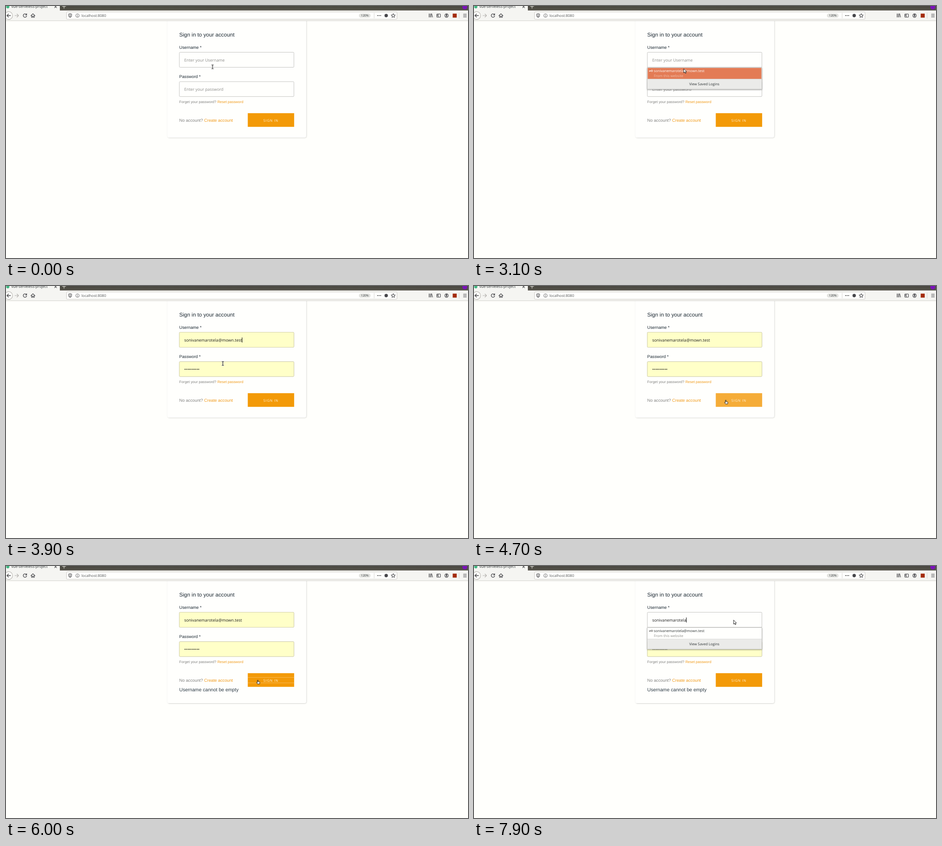
Write an HTML page that moves like this. It is 1012 px wide and 553 px high and loops after 8000 ms.

```html
<!DOCTYPE html>
<html lang="en">
<head>
<meta charset="utf-8">
<title>Sign in</title>
<style>
html, body { margin: 0; width: 100%; height: 100%; overflow: hidden; background: #fffffc; }
svg { display: block; }
text { font-family: "Liberation Sans", Arial, sans-serif; text-rendering: geometricPrecision; white-space: pre; }
.ui, .field { font-family: "Open Sans", "Noto Sans", sans-serif; }
.ui { font-size: 7.8px; fill: #2e3436; }
.field { font-size: 8.9px; fill: #1c1c1c; }
.hint { fill: #8b8b89; }
.label { font-size: 9.27px; fill: #1b2832; }
.small { font-size: 7.95px; }
.note { fill: #828280; }
.link { fill: #f09a1a; }
.box { fill: #fffffd; stroke: #c4c4c2; }
.auto { fill: #ffffc8; stroke: #d3d0ac; }
.icon { fill: none; stroke: #46464a; stroke-width: 1.1; stroke-linejoin: round; stroke-linecap: round; }

/* Every track shares one 8 s clock; 1.25% is 100 ms. */
.a { animation: 8s step-end infinite; }
.popup { animation-name: popup; }
.row { animation-name: row; }
.empty { animation-name: empty; }
.filled { animation-name: filled; }
.domain { animation-name: domain; }
.caret { animation-name: caret; }
.sel { animation-name: sel; }
.btn { animation-name: btn; }
.ring { animation-name: ring; }
.msg { animation-name: msg; }
.card { animation-name: card; }
.cursor { animation-name: move; }
.ibeam { animation-name: ibeam; }
.arrow { animation-name: arrow; }
.hand { animation-name: hand; }

@keyframes popup {
  0%, 45% { visibility: hidden; }
  15%, 98.75%, 100% { visibility: visible; }
}
@keyframes row {
  0%, 45%, 100% { --row: #fffffd; --name: #2e3436; --sub: #8f8f8d; --key: #555; }
  38.75% { --row: #e37b55; --name: #fff; --sub: #f0bfa9; --key: #fff; }
}
@keyframes empty {
  0% { visibility: visible; }
  46.25%, 100% { visibility: hidden; }
}
@keyframes filled {
  0% { visibility: hidden; }
  46.25%, 100% { visibility: visible; }
}
@keyframes domain {
  0%, 98.75%, 100% { visibility: hidden; }
  46.25% { visibility: visible; }
}
@keyframes caret {
  0%, 32.5%, 58.75% { visibility: hidden; transform: none; }
  13.75%, 43.75% { visibility: visible; transform: none; }
  46.25% { visibility: visible; transform: translateX(126px); }
  98.75%, 100% { visibility: visible; transform: translateX(74px); }
}
@keyframes sel {
  0%, 98.75%, 100% { width: 0; }
  88.75% { width: 23px; }
  90% { width: 52px; }
}
@keyframes btn {
  0%, 63.75%, 75%, 100% { fill: #f39a08; }
  52.5%, 66.25% { fill: #f5ac38; }
}
@keyframes ring {
  0%, 88.75%, 100% { visibility: hidden; }
  63.75% { visibility: visible; }
}
@keyframes msg {
  0% { visibility: hidden; }
  66.25%, 100% { visibility: visible; }
}
@keyframes card {
  0% { height: 268px; }
  66.25%, 100% { height: 280.5px; }
}
@keyframes move {
  0% { transform: translate(452.4px, 133.5px); }
  1.25% { transform: translate(459px, 134px); }
  8.75% { transform: translate(460px, 131px); }
  10% { transform: translate(460px, 126px); }
  11.25% { transform: translate(459px, 123px); }
  15% { transform: translate(457.5px, 120.5px); }
  38.75% { transform: translate(459px, 137px); }
  40% { transform: translate(461.2px, 149.8px); }
  48.75% { transform: translate(475px, 170px); }
  50% { transform: translate(507px, 204px); }
  51.25% { transform: translate(545px, 226px); }
  52.5% { transform: translate(586px, 240px); }
  55% { transform: translate(542px, 253px); }
  56.25% { transform: translate(551.4px, 249.8px); }
  76.25% { transform: translate(537px, 238px); }
  77.5% { transform: translate(505px, 206px); }
  78.75% { transform: translate(478px, 176px); }
  80% { transform: translate(461px, 135px); }
  81.25% { transform: translate(468px, 115.5px); }
  85% { transform: translate(470px, 118px); }
  86.25% { transform: translate(466.8px, 119px); }
  88.75% { transform: translate(490px, 119px); }
  90% { transform: translate(540px, 119px); }
  91.25% { transform: translate(569px, 119.8px); }
  93.75% { transform: translate(569.4px, 119px); }
  98.75%, 100% { transform: translate(568.2px, 118px); }
}
@keyframes ibeam {
  0%, 8.75%, 48.75%, 78.75% { visibility: visible; }
  1.25%, 15%, 50%, 98.75%, 100% { visibility: hidden; }
}
@keyframes arrow {
  0%, 8.75%, 48.75%, 52.5%, 78.75% { visibility: hidden; }
  1.25%, 15%, 50%, 77.5%, 98.75%, 100% { visibility: visible; }
}
@keyframes hand {
  0%, 77.5%, 100% { visibility: hidden; }
  52.5% { visibility: visible; }
}
</style>
</head>
<body>
<svg width="1012" height="553" viewBox="0 0 1012 553">
  <defs>
    <linearGradient id="strip" x2="0" y2="1">
      <stop stop-color="#48463f"/><stop offset="1" stop-color="#57544c"/>
    </linearGradient>
    <filter id="soft" x="-10%" y="-10%" width="120%" height="120%">
      <feDropShadow dx="0.7" dy="0.7" stdDeviation="1.3" flood-opacity=".22"/>
    </filter>
    <filter id="drop" x="-10%" y="-20%" width="120%" height="150%">
      <feDropShadow dx="0" dy="1" stdDeviation="1.7" flood-opacity=".5"/>
    </filter>
  </defs>
  <rect width="1012" height="553" fill="#fffffc"/>

  <!-- Card -->
  <rect class="a card" x="353.5" y="20.5" width="304" height="268" rx="4" fill="#fffffd" filter="url(#soft)"/>
  <text x="379.5" y="66.8" font-size="11.9" fill="#1b2832">Sign in to your account</text>
  <text class="label" x="379.5" y="94.3">Username *</text>
  <text class="label" x="379.5" y="158.2">Password *</text>
  <rect class="box" x="379.7" y="101.5" width="251" height="33" rx="1.8"/>
  <rect class="box" x="379.7" y="166" width="251" height="32.7" rx="1.8"/>
  <g class="a empty">
    <text class="field hint" x="390.5" y="121.7">Enter your Username</text>
    <text class="field hint" x="390.5" y="185.7">Enter your password</text>
  </g>
  <g class="a filled">
    <rect class="auto a domain" x="379.7" y="101.5" width="251" height="33" rx="1.8"/>
    <rect class="auto" x="379.7" y="166" width="251" height="32.7" rx="1.8"/>
    <text class="field" x="390.5" y="121.7">sonivanemarotela</text>
    <text class="field a domain" x="465.2" y="121.7">@mown.test</text>
    <text class="field" x="390.5" y="185.7">••••••••••</text>
  </g>
  <svg class="a sel" x="465" y="113" width="0" height="11.3">
    <rect width="52" height="11.3" fill="#e97a35"/>
    <text class="field" x=".2" y="8.7" style="fill:#fff3e4">@mown.test</text>
  </svg>
  <rect class="a caret" x="390.6" y="113" width="1.1" height="11" fill="#111"/>

  <text class="small note" x="379.5" y="213.3">Forget your password? <tspan class="link">Reset password</tspan></text>
  <text class="note" x="379.5" y="253.5" font-size="9.27">No account? <tspan class="link">Create account</tspan></text>
  <rect class="a btn" x="529.6" y="235.2" width="101.6" height="30" fill="#f39a08"/>
  <path class="a ring" d="M530 244.5H631M530 256.5H631" stroke="#fbd394" stroke-width=".8" stroke-dasharray="1 .5"/>
  <text class="ui" x="563.8" y="253.5" style="font-size:7.5px;fill:#fdf2dc;letter-spacing:.85px">SIGN IN</text>
  <text class="a msg" x="379.5" y="275.1" font-size="10.58" fill="#2c3a45">Username cannot be empty</text>

  <!-- Saved logins -->
  <g class="a popup">
    <g class="a row">
      <rect x="379.6" y="135" width="251" height="47.6" fill="#fffffd" filter="url(#drop)"/>
      <rect x="380.4" y="135.8" width="249.2" height="24.4" style="fill:var(--row)"/>
      <rect x="380.2" y="160.2" width="249.8" height="21.6" fill="#ebebe9"/>
      <path d="M380 160.3H630" stroke="#d2d2d0" stroke-width=".7"/>
      <rect x="379.6" y="135" width="251" height="47.2" fill="none" stroke="#b9b9b7" stroke-width=".8"/>
      <path d="M383.5 142.3H388M384.3 142.3v1.8M386 142.3v1.4" fill="none" style="stroke:var(--key)"/>
      <circle cx="389.7" cy="142.3" r="1.7" fill="none" style="stroke:var(--key)"/>
      <text class="ui" x="394" y="145.3" style="fill:var(--name)">sonivanemarotela@mown.test</text>
      <text class="ui" x="394" y="156" style="fill:var(--sub)">From this website</text>
      <text class="ui" x="504.5" y="173.9" text-anchor="middle">View Saved Logins</text>
    </g>
  </g>

  <!-- Browser bar -->
  <rect width="1012" height="32.5" fill="#f5f5f2"/>
  <path d="M0 32.4H1012" stroke="#cfcdc8" stroke-width=".9"/>
  <rect x="118" width="894" height="9.8" fill="url(#strip)"/>
  <circle cx="4" cy="1.8" r="3.4" fill="#41b883"/>
  <text class="ui" x="11.8" y="4" style="font-size:8.05px">vue-serveless-project</text>
  <g class="icon">
    <path d="M106.3-.8l4.6 4.6M110.9-.8l-4.6 4.6"/>
    <path d="M123.3 1h7.6M127.1-3v8" stroke="#e4e2dc"/>
    <circle cx="5.8" cy="21" r="8.6" fill="#fcfcfa" stroke="#b5b3ae"/>
    <path d="M10 21H2M5.5 17.5L2 21l3.5 3.5" stroke-width="1.3"/>
    <path d="M19.5 21h8M24 17.5l3.5 3.5-3.5 3.5" stroke="#b2b0ac"/>
    <path d="M44.6 18.7A3.8 3.8 0 1 0 45.2 22M45.3 16.8v2.8h-2.8" stroke-width="1.3"/>
    <path d="M54.6 21.3L59 17l4.4 4.3M56 20.5V25h2v-2.6h2V25h2v-4.5" stroke-width="1.2"/>
  </g>
  <rect x="132.5" y="13" width="724" height="16" rx="1.8" fill="#fffffd" stroke="#c7c5c0" stroke-width=".9"/>
  <g class="icon" stroke-width=".9">
    <path d="M140.5 16.8l3.2 1v2.6q0 3-3.2 4.6-3.2-1.6-3.2-4.6v-2.6zM140.5 18.5v4.5"/>
    <circle cx="156.6" cy="21" r="3.7" stroke="#77777a"/>
    <path d="M156.6 20.6v2.3M156.6 18.9v.1" stroke="#77777a"/>
    <path d="M848.2 16.6l1.3 2.9 3.2.3-2.4 2.1.7 3.1-2.8-1.6-2.8 1.6.7-3.1-2.4-2.1 3.2-.3z"/>
    <path d="M926.7 17v7.5M929 17v7.5M931.2 17v7.5M932.4 17l2 7.5"/>
    <rect x="943.6" y="17.5" width="8" height="7" rx="1"/>
    <path d="M946.8 17.5v7M944.6 19.5h1M944.6 21.3h1"/>
    <circle cx="965" cy="21" r="3.9"/>
    <circle cx="965" cy="19.8" r="1.3" fill="#46464a"/>
    <path d="M963 23.4q2-1.6 4 0"/>
    <path d="M1002 18h6.5M1002 21h6.5M1002 24h6.5" stroke-width="1.2"/>
    <path d="M806.4 15.5v11M992.6 15v12" stroke="#d3d1cd" stroke-width=".9"/>
  </g>
  <text class="ui" x="165.3" y="24" style="font-size:8px;fill:#55575a">localhost:8080</text>
  <rect x="773" y="16.5" width="25.6" height="9" rx="4.5" fill="#e3e3e0"/>
  <text class="ui" x="785.9" y="23.3" text-anchor="middle" style="font-size:6.4px">120%</text>
  <g fill="#46464a">
    <circle cx="814" cy="21" r="1.1"/><circle cx="817.3" cy="21" r="1.1"/><circle cx="820.6" cy="21" r="1.1"/>
    <circle cx="832.8" cy="21" r="3.7"/>
  </g>
  <rect x="978.5" y="16.7" width="8.8" height="8.8" fill="#a32c0d"/>
  <circle cx="1005" cy="2.2" r="5.4" fill="#7a12b8"/>

  <!-- Mouse -->
  <g class="a cursor">
    <g class="a ibeam" fill="none">
      <path id="beam" d="M-2.2-4.3Q0-4.3 0-3.2 0-4.3 2.2-4.3M0-3.2V3.2M-2.2 4.3Q0 4.3 0 3.2 0 4.3 2.2 4.3" stroke="#fff" stroke-width="2.2"/>
      <use href="#beam"/>
      <path d="M-2.2-4.3Q0-4.3 0-3.2 0-4.3 2.2-4.3M0-3.2V3.2M-2.2 4.3Q0 4.3 0 3.2 0 4.3 2.2 4.3" stroke="#222" stroke-width="1.2"/>
    </g>
    <path class="a arrow" d="M.4.6V9.6L2.5 7.7 4 11 5.5 10.3 4 7.1H6.7Z" fill="#fff" stroke="#1a1a1a" stroke-width=".95" stroke-linejoin="round"/>
    <path class="a hand" d="M-.7.9Q0 0 .8.9V3.8L4 4.5Q4.8 4.8 4.6 5.8L4 9H-.2L-2.7 5.9Q-2.5 4.7-.7 5.8Z" fill="#fff" stroke="#1a1a1a" stroke-linejoin="round"/>
  </g>
</svg>
</body>
</html>
```
